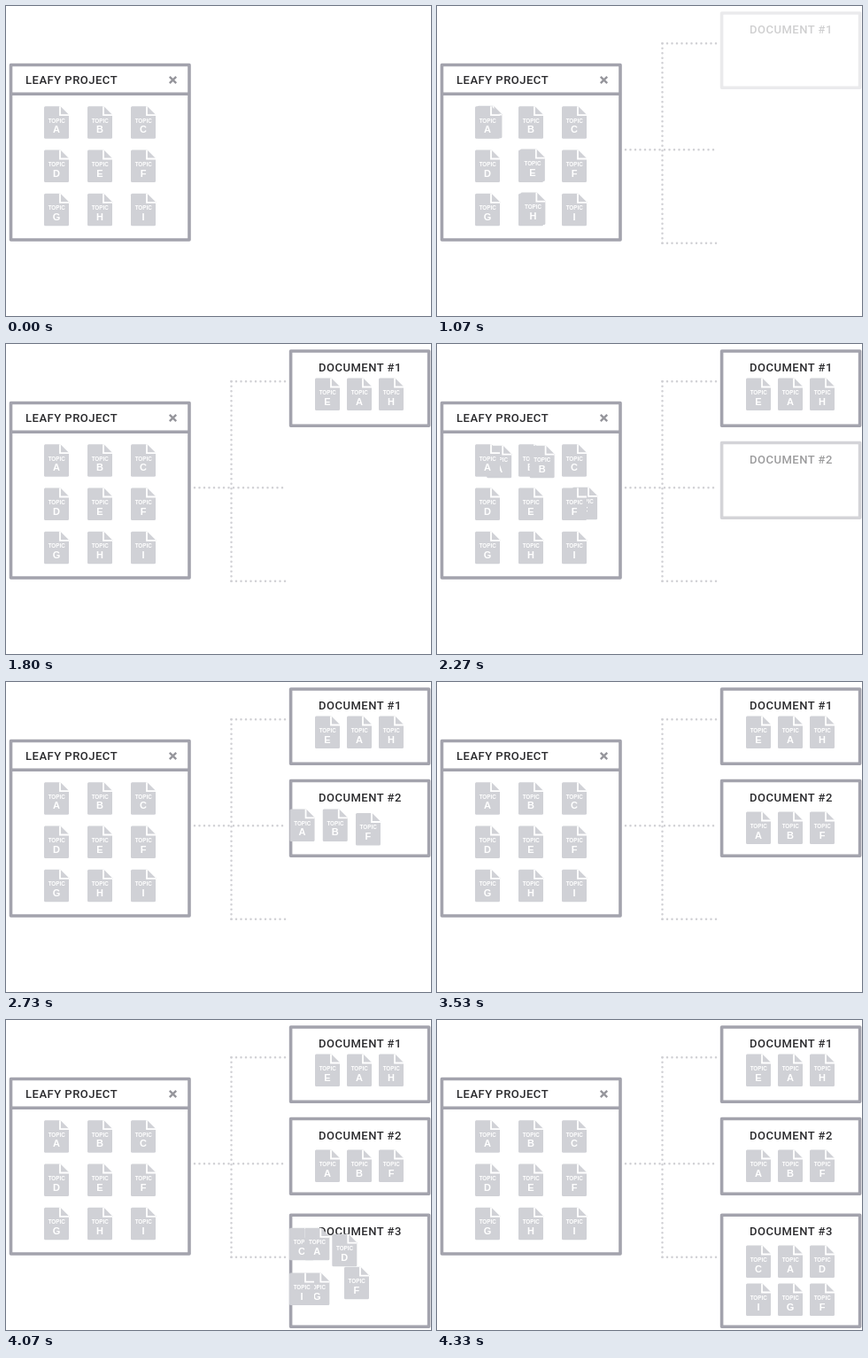
Animation, 480 px wide and 350 px high, one loop 4.99 s. Source, as an HTML page:

```html
<!DOCTYPE html>
<html lang="en">
<head>
<meta charset="utf-8">
<title>Topics reused in documents</title>
<style>
  html, body { margin: 0; width: 100%; height: 100%; overflow: hidden; background: #fff; }
  svg { display: block; width: 480px; height: 350px; }
  .box { fill: none; stroke: #a3a3ad; stroke-width: 3.6; stroke-linejoin: round; }
  .title { font: 500 13px Roboto, sans-serif; letter-spacing: .5px; fill: #2b2b2e; }
  .dots { fill: none; stroke: #d0d0d4; stroke-width: 2.5; stroke-linecap: round; stroke-dasharray: 0 5.5; }
  .page { fill: #d0d1d6; }
  .fold { fill: none; stroke: #fff; stroke-width: 1.8; }
  .topic { font: bold 6.3px "Liberation Sans", Arial, sans-serif; fill: #fff; text-anchor: middle; }
  .letter { font: bold 11px "Liberation Sans", Arial, sans-serif; fill: #fff; text-anchor: middle; }
</style>
</head>
<body>
<svg viewBox="0 0 480 350">
  <defs>
    <clipPath id="wipe"><rect id="wipeRect" x="209" y="35" width="0" height="240"/></clipPath>
  </defs>
  <g class="dots" clip-path="url(#wipe)">
    <path d="M213 162.3H316"/>
    <path d="M254.5 42.3V269"/>
    <path d="M254.5 42.3H316"/>
    <path d="M254.5 267.8H316"/>
  </g>
  <path class="box" d="M5.5 66.5H207V264H5.5ZM5.5 99.2H207"/>
  <text class="title" x="22" y="88">LEAFY PROJECT</text>
  <path d="M184.8 79.8l7.4 7.4m0-7.4l-7.4 7.4" stroke="#96969c" stroke-width="2.4"/>
  <g id="docs"></g>
  <g id="under"></g>
  <g id="originals"></g>
  <g id="over"></g>
</svg>
<script>
const LOOP = 4990, TICK = 1000 / 15, FADE = 450;
const byId = id => document.getElementById(id);
const clamp = v => Math.min(1, Math.max(0, v));
const easeInOut = u => u < .5 ? 4 * u ** 3 : 1 - 4 * (1 - u) ** 3;

// "behind" lists the topics whose copies slide out below the stack
const documents = [
  { y: 8, height: 84.3, row: 38.5, topics: "EAH", behind: "A", start: 967, duration: 820 },
  { y: 111.5, height: 84.8, row: 146.5, topics: "ABF", behind: "AF", start: 2058, duration: 945 },
  { y: 220.3, height: 126, row: 254.5, topics: "CADIGF", behind: "G", start: 3565, duration: 745 }
];

function addGroup(parent, markup) {
  const group = document.createElementNS("http://www.w3.org/2000/svg", "g");
  group.innerHTML = markup;
  byId(parent).append(group);
  return group;
}

function place(group, x, y) {
  group.setAttribute("transform", `translate(${x} ${y})`);
}

function addTopic(parent, letter) {
  return addGroup(parent, `
    <path class="page" d="M1.5 0H18.5L28 9.5V35Q28 36.5 26.5 36.5H1.5Q0 36.5 0 35V1.5Q0 0 1.5 0Z"/>
    <path class="fold" d="M18 0V10H28"/>
    <text class="topic" x="14.2" y="18.4">TOPIC</text>
    <text class="letter" x="14" y="30">${letter}</text>`);
}

function home(letter) {
  const i = "ABCDEFGHI".indexOf(letter);
  return { x: 43 + 49 * (i % 3), y: 113.2 + 49.3 * Math.floor(i / 3) };
}

for (const letter of "ABCDEFGHI") {
  const { x, y } = home(letter);
  place(addTopic("originals", letter), x, y);
}

documents.forEach((doc, index) => {
  doc.group = addGroup("docs", `
    <rect class="box" x="321.6" y="${doc.y}" width="156" height="${doc.height}"/>
    <text class="title" x="353" y="${doc.y + 23}">DOCUMENT #${index + 1}</text>`);
  doc.copies = [...doc.topics].map((letter, i) => ({
    from: home(letter),
    to: { x: 349 + 36 * (i % 3), y: doc.row + 43 * Math.floor(i / 3) },
    group: addTopic(doc.behind.includes(letter) ? "under" : "over", letter)
  }));
});

function draw(time) {
  // 15 steps per second, with two held steps
  let step = Math.floor((time + 3.4) / TICK);
  if (step === 3 || step === 23) step--;
  const t = step * TICK;

  const wipe = 1 - (1 - clamp(t / 250)) ** 2;
  byId("wipeRect").setAttribute("width", t > 0 ? 3 + 106 * wipe : 0);

  for (const doc of documents) {
    const age = t - doc.start;
    const p = easeInOut(clamp(age / doc.duration));
    doc.group.setAttribute("opacity", clamp(age / FADE));
    for (const { from, to, group } of doc.copies) {
      group.setAttribute("visibility", p > 0 ? "visible" : "hidden");
      place(group, from.x + (to.x - from.x) * p, from.y + (to.y - from.y) * p);
    }
  }
}

const origin = performance.now();
function tick() {
  draw((performance.now() - origin) % LOOP);
  requestAnimationFrame(tick);
}
tick();
</script>
</body>
</html>
```
